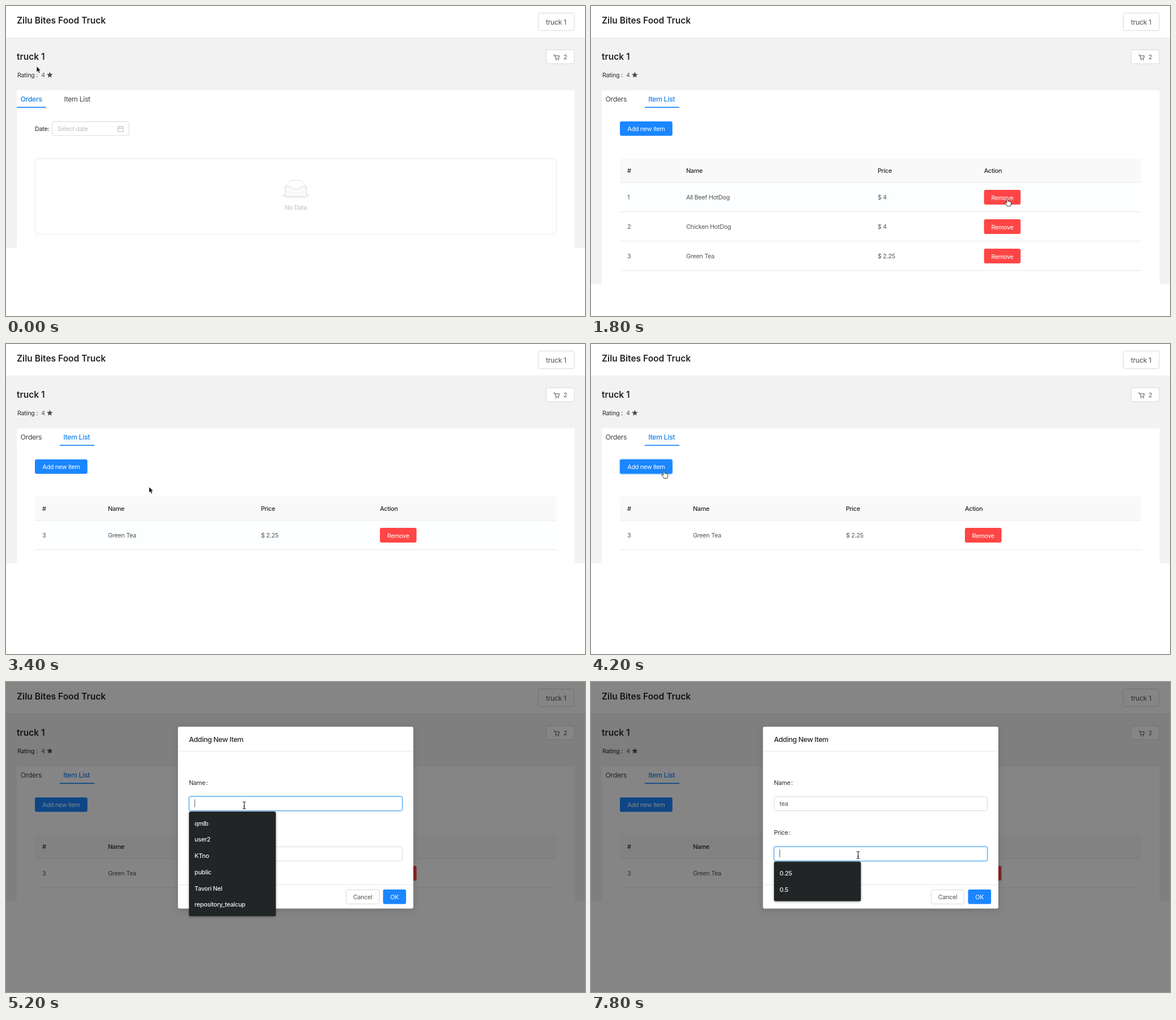
Recreate the animation shown at these times as an HTML page. Size 1022 by 548 pixels, loop 8 s.

```html
<!DOCTYPE html>
<html lang="en">
<head>
<meta charset="utf-8">
<title>Food truck admin</title>
<style>
  html, body { margin: 0; width: 100%; height: 100%; overflow: hidden; background: #fff; }
  svg { display: block; width: 1022px; height: 548px; }
  text { font: 10.8px Inter, "Liberation Sans", sans-serif; letter-spacing: -.028em; fill: #555; white-space: pre; }
  .h { font-size: 15.44px; font-weight: 600; letter-spacing: .003em; fill: #222; }
  .lg { font-size: 12.35px; }
  .m { font-weight: 500; fill: #262626; }
  .dark { fill: #2b2b2b; }
  .mid { text-anchor: middle; }
  .w { fill: #fff; }
  .ph { fill: #bdbdbd; }
  .tab { font-size: 12.35px; fill: #444; }
  .tab.on { fill: #1b84ee; font-weight: 500; }
  .blue { fill: #1a86ff; }
  .red { fill: #ff4545; }
  .box { fill: #fff; stroke: #d9d9d9; }
  .line { fill: none; stroke: #e8e8e8; }
  .field { fill: #fff; stroke: #d9d9d9; }
  .field.on { stroke: #45a0ee; }
  .ring { fill: none; stroke: #1890ff; stroke-opacity: .2; stroke-width: 2; }
  .menu rect { fill: #212526; filter: drop-shadow(0 1px 2px rgba(0, 0, 0, .35)); }
  .menu text { fill: #f1f1f1; font-weight: 500; }
  #dialog { filter: drop-shadow(0 3px 6px rgba(0, 0, 0, .15)); }
</style>
</head>
<body>
<svg viewBox="0 0 1022 548">
  <rect width="1022" height="548" fill="#fff"/>
  <rect id="page" y="57" width="1022" height="370" fill="#f2f2f2"/>
  <path class="line" d="M0 56.5H1022"/>
  <text class="h" x="19" y="30.5">Zilu Bites Food Truck</text>
  <rect class="box" x="939.5" y="12.5" width="63.5" height="31" rx="3"/>
  <text class="lg mid" x="971" y="33">truck 1</text>

  <text class="h" x="19" y="95">truck 1</text>
  <rect class="box" x="953.5" y="77.5" width="49.5" height="24.5" rx="3"/>
  <g fill="none" stroke="#4a4a4a">
    <path d="M966.5 86.5H968.5L970.3 92.8H975.6L976.6 88H969"/>
    <circle cx="970.8" cy="95" r=".6"/>
    <circle cx="975" cy="95" r=".6"/>
  </g>
  <text x="984" y="94.3">2</text>
  <text class="dark" x="20" y="125.5">Rating</text>
  <text class="dark" x="53" y="125.5">:</text>
  <text x="62" y="125.5">4</text>
  <path id="star" fill="#4c4c4c"/>

  <rect id="panel" x="19" y="149" width="984.5" height="278" fill="#fff"/>
  <text class="tab" id="tabA" x="25.5" y="169.3">Orders</text>
  <text class="tab" id="tabB" y="169.3">Item List</text>
  <rect class="blue" id="ink" y="178.3" height="1.7"/>

  <g id="orders">
    <text class="m" x="51" y="221" style="fill:#444">Date:</text>
    <rect class="box" x="81.5" y="204.5" width="135.5" height="24.5" rx="3"/>
    <text class="ph" x="90.5" y="221">Select date</text>
    <path d="M197.5 213.5H207V222H197.5ZM197.5 216.5H207M200 211.8V214.5M204.5 211.8V214.5" fill="none" stroke="#b8b8b8"/>
    <rect class="line" x="51.5" y="269.5" width="920" height="133.5" rx="3"/>
    <g transform="translate(485.8 308.6) scale(.8)">
      <ellipse cx="32" cy="33" rx="32" ry="7" fill="#f3f3f3"/>
      <path d="M55 13L45 1.3Q44 0 43 0H21Q20 0 19 1.3L9 13V22H55Z" fill="#fff" stroke="#d4d4d4"/>
      <path d="M41.6 16Q41.6 13 43.8 13H55V31Q55 35 52 35H12Q9 35 9 31V13H20Q22.4 13 22.4 16T24.6 18.9H39.4Q41.6 18.9 41.6 16Z" fill="#fafafa" stroke="#d4d4d4"/>
    </g>
    <text class="ph mid" x="511.5" y="359.5">No Data</text>
  </g>

  <g id="items">
    <rect class="ring" id="wave" x="50" y="203" width="94.5" height="27.5" rx="4"/>
    <rect class="blue" x="51" y="204" width="92.7" height="25.5" rx="3"/>
    <text class="mid w" x="97.4" y="221">Add new item</text>
    <rect x="51" y="269.5" width="920.5" height="42" rx="3" fill="#f9f9f9"/>
    <rect id="hover" x="51" y="312" width="920.5" height="51.5" fill="#e0f5fe"/>
    <g id="table"></g>
  </g>

  <rect id="mask" width="1022" height="548"/>

  <g id="modal">
    <rect id="dialog" x="303.5" y="79" width="415.5" height="321.5" rx="3" fill="#fff"/>
    <path class="line" d="M303.5 122.5H719M303.5 358.5H719"/>
    <text class="m lg" x="323" y="105.5">Adding New Item</text>
    <text class="dark" x="323" y="181.5">Name</text><text class="dark" x="353.3" y="181.5">:</text>
    <text class="dark" x="323" y="270.2">Price</text><text class="dark" x="349.3" y="270.2">:</text>
    <rect class="ring" id="ring" x="322" width="378.5" height="27" rx="4"/>
    <rect class="field" id="fieldA" x="323.2" y="202.5" width="376.3" height="25" rx="3"/>
    <rect class="field" id="fieldB" x="323.2" y="291.2" width="376.3" height="25" rx="3"/>
    <text id="typed" x="332.8" y="219"></text>
    <rect id="caret" width="1" height="14" fill="#555"/>
    <rect class="box" x="600.5" y="367.3" width="58.3" height="25" rx="3"/>
    <text class="mid" x="629.5" y="384.3">Cancel</text>
    <rect class="blue" x="665.5" y="366.8" width="40.7" height="25.7" rx="3"/>
    <text class="mid w" x="685.7" y="384.3">OK</text>
  </g>
  <g class="menu" id="menuA"></g>
  <g class="menu" id="menuB"></g>

  <g id="pointer">
    <path id="arrow" d="M0 0V10.6L2.4 8.4L4.2 12.4L6 11.6L4.3 7.7H7.5Z" fill="#111" stroke="#fff" stroke-width=".7"/>
    <path id="hand" d="M-1.2 1C-1.2-.4 1-.4 1 1V5C1.3 4.4 2.8 4.4 3 5.4C3.5 4.8 4.8 5 5 6C5.6 5.6 6.6 6 6.6 7V9.5C6.6 11 5.5 12 5.5 13.3H-.5C-.8 11.5-3 9.5-4.2 7.6C-4.4 6.5-3.2 6-2.2 7L-1.2 8Z" fill="#fff" stroke="#222" stroke-width=".9"/>
    <path id="beam" d="M-2.8-6.3Q0-6.3 0-4.8Q0-6.3 2.8-6.3M0-5V5M-2.8 6.3Q0 6.3 0 4.8Q0 6.3 2.8 6.3M-1.5 2H1.5" fill="none" stroke="#222" stroke-width="1.1"/>
  </g>
</svg>
<script>
const LOOP = 8000, STEP = 200;
const $ = id => document.getElementById(id);
const set = (id, attrs) => { for (const k in attrs) $(id).setAttribute(k, attrs[k]); };
const show = (id, on) => { $(id).style.display = on ? '' : 'none'; };
const within = (t, a, b) => t >= a && t < b;

// Eased interpolation through rows of [time, ...values].
function track(keys, t) {
  const i = keys.findIndex(k => k[0] > t);
  if (i < 0) return keys[keys.length - 1].slice(1);
  if (i === 0) return keys[0].slice(1);
  const a = keys[i - 1], b = keys[i], p = (t - a[0]) / (b[0] - a[0]);
  const e = p * p * (3 - 2 * p);
  return a.slice(1).map((v, j) => v + (b[j + 1] - v) * e);
}

const path = [
  [0, 54, 106.5], [600, 123, 164], [800, 125, 164], [1600, 728, 338], [1800, 735, 340.5],
  [2200, 735, 340.5], [2800, 719, 343], [3000, 719, 343], [3400, 252.5, 252.5],
  [3800, 129, 224], [4200, 129, 224], [4400, 260.5, 221.5], [4800, 424, 216],
  [5200, 420.5, 218], [6800, 420.5, 218], [7400, 468, 304], [7800, 471.5, 306]
];
const hoverKeys = [[1600, 0], [1800, .12], [2000, 1], [3000, 1], [3400, .12], [3600, 0]];
const openKeys = [[4200, 0, 0, 0], [4400, .917, .96, .29], [4600, 1, 1, .48]];

const goods = [['All Beef HotDog', '4'], ['Chicken HotDog', '4'], ['Green Tea', '2.25']];

function tableMarkup(first) {
  const [name, price, action] = first === 2 ? [180, 450, 660] : [168, 506, 693.7];
  const cols = [[64, '#'], [name, 'Name'], [price, 'Price'], [action, 'Action']];
  const head = cols.map(([x, s]) => `<text class="m" x="${x}" y="295">${s}</text>`).join('');
  const rows = goods.slice(first).map(([label, cost], i) => `
    <g transform="translate(0 ${i * 52})">
      <path class="line" d="M51 363.7H971.5"/>
      <text x="64" y="342">${first + i + 1}</text>
      <text x="${name}" y="342">${label}</text>
      <text x="${price}" y="342">$ ${cost}</text>
      <rect class="red" x="${action}" y="325" width="64.6" height="26" rx="3"/>
      <text class="mid w" x="${action + 32.3}" y="342.7">Remove</text>
    </g>`).join('');
  return head + '<path class="line" d="M51 311.7H971.5"/>' + rows;
}

function fillMenu(id, y, h, list) {
  $(id).innerHTML = `<rect x="323" y="${y}" width="153.3" height="${h}" rx="3"/>` +
    list.map((s, i) => `<text x="332.8" y="${y + 24.6 + i * 28.75}">${s}</text>`).join('');
}

function starPath(cx, cy, r) {
  const pts = Array.from({ length: 10 }, (_, i) => {
    const a = i * Math.PI / 5, q = i % 2 ? r * .45 : r;
    return `${cx + q * Math.sin(a)} ${cy - q * Math.cos(a)}`;
  });
  return 'M' + pts.join('L') + 'Z';
}

set('star', { d: starPath(77.3, 122, 5.6) });
fillMenu('menuA', 229, 185, ['qmlb', 'user2', 'KTno', 'public', 'Tavori Nel', 'repository_tealcup']);
fillMenu('menuB', 317.5, 70, ['0.25', '0.5']);

let shownFirst = -1;

function drawPage(t) {
  const list = t >= 800;
  const first = t < 2200 ? 0 : t < 3000 ? 1 : 2;
  const bottom = list ? 491.5 - first * 52 : 427.5;
  set('page', { height: bottom - 57 });
  set('panel', { height: bottom - 149 });
  $('tabA').classList.toggle('on', !list);
  $('tabB').classList.toggle('on', list);
  set('tabB', { x: list ? 101.2 : 102.5 });
  const [x, w] = track([[600, 19, 51.3], [1000, 95, 61]], t);
  set('ink', { x, width: w });
  show('orders', !list);
  show('items', list);
  if (first !== shownFirst) $('table').innerHTML = tableMarkup(shownFirst = first);
  set('hover', { opacity: track(hoverKeys, t)[0] });
  show('wave', within(t, 4200, 4600));
}

function drawModal(t) {
  const [scale, alpha, dim] = track(openKeys, t);
  set('mask', { opacity: dim });
  show('modal', scale > 0);
  // The dialog grows out of the place that was clicked.
  set('modal', { opacity: alpha, transform: `translate(129 224) scale(${scale}) translate(-129 -224)` });
  const price = t >= 7400;
  $('fieldA').classList.toggle('on', !price);
  $('fieldB').classList.toggle('on', price);
  set('ring', { y: price ? 290.2 : 201.5 });
  const word = 'tea'.slice(0, Math.max(0, Math.floor((t - 6000) / 200)));
  $('typed').textContent = word;
  const typing = within(t, 6200, 7000);
  const since = t - (price ? 7400 : t >= 5000 ? 5000 : 4400);
  show('caret', typing || since % 1000 < 500);
  const end = word ? $('typed').getComputedTextLength() : 0;
  set('caret', { x: 332.6 + (price ? 0 : end), y: price ? 296.2 : 207.5 });
  show('menuA', within(t, 5000, 6200));
  show('menuB', t >= 7600);
}

function drawPointer(t) {
  const hand = within(t, 600, 1000) || within(t, 1600, 3200) || within(t, 3800, 4400);
  const beam = t >= 4600;
  show('hand', hand);
  show('beam', beam);
  show('arrow', !hand && !beam);
  show('pointer', !within(t, 6200, 7000));
  set('pointer', { transform: `translate(${track(path, t).join(' ')})` });
}

const start = performance.now();
function frame() {
  const t = Math.floor((performance.now() - start) % LOOP / STEP) * STEP;
  drawPage(t);
  drawModal(t);
  drawPointer(t);
  requestAnimationFrame(frame);
}
frame();
</script>
</body>
</html>
```
